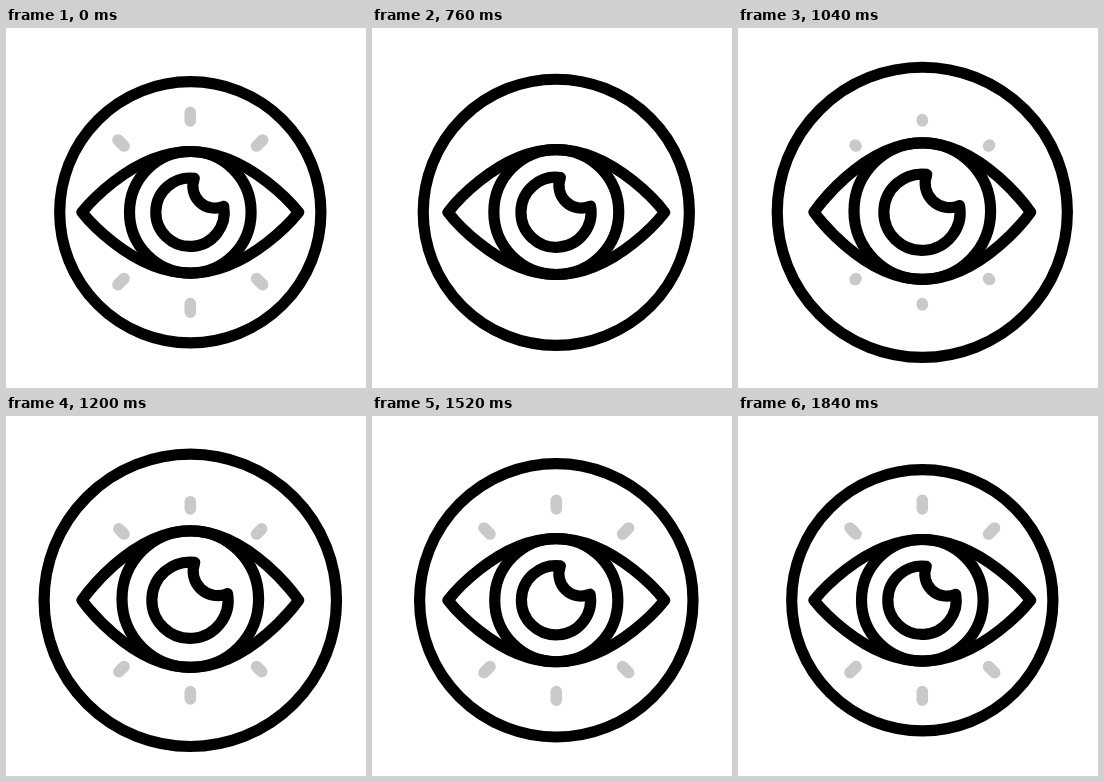
These frames come from a looping animation (360 px wide and 360 px high, 1.88 s). An HTML page:

```html
<!DOCTYPE html>
<html>
<head>
<meta charset="utf-8">
<style>
html, body { margin: 0; width: 100%; height: 100%; overflow: hidden; background: #fff; }
svg { display: block; width: 360px; height: 360px; }
</style>
</head>
<body>
<svg viewBox="0 0 360 360">
  <g transform="translate(184.3 184.3)" fill="none" stroke="#000" stroke-width="11.2" stroke-linecap="round" stroke-linejoin="round">
    <circle id="ring"/>
    <path id="rays" stroke="#c9c9c9" stroke-width="11.6"/>
    <path id="lids"/>
    <circle id="iris"/>
    <path id="pupil"/>
  </g>
</svg>
<script>
const LOOP = 1880;
const [ring, rays, lids, iris, pupil] =
  ['ring', 'rays', 'lids', 'iris', 'pupil'].map(id => document.getElementById(id));

// Smooth 0..1 progress between two times
function ease(t, from, to) {
  const u = Math.min(1, Math.max(0, (t - from) / (to - from)));
  return u * u * (3 - 2 * u);
}

function rayPath(length) {
  if (length <= 0.01) return '';
  return [-90, -45, 45, 90, 135, 225].map(deg => {
    const a = deg * Math.PI / 180;
    const inner = deg % 90 ? 93.7 : 91.3;
    const at = r => `${r * Math.cos(a)} ${r * Math.sin(a)}`;
    return `M${at(inner)}L${at(inner + length)}`;
  }).join('');
}

function draw(t) {
  // The eye moves faster than the ring around it
  const swell = ease(t, 640, 1120) - ease(t, 1200, 1760);
  const widen = ease(t, 640, 1040) - ease(t, 1200, 1600);
  ring.setAttribute('r', 130.6 + 15.6 * swell);

  const r = 60.8 + 7.5 * widen;
  const lift = -1.2 * widen;
  const top = lift - r, bottom = lift + r;
  iris.setAttribute('r', r);
  iris.setAttribute('cy', lift);
  lids.setAttribute('d',
    `M-108.3 0C-108.3 0 -60.3 ${top} 0 ${top}S108.3 0 108.3 0S60.3 ${bottom} 0 ${bottom}S-108.3 0 -108.3 0Z`);

  const s = 1 + 0.115 * widen;
  const p = (x, y) => `${x * s} ${y * s}`;
  pupil.setAttribute('d',
    `M${p(4, -34)}A${p(34.2, 34.2)} 0 1 0 ${p(33.4, -6)}A${p(22, 22)} 0 0 1 ${p(4, -34)}Z`);

  const shown = 1 - ease(t, 40, 440) + ease(t, 960, 1280);
  rays.setAttribute('d', rayPath(8.6 * shown));
}

const start = performance.now();
function tick() {
  draw((performance.now() - start) % LOOP);
  requestAnimationFrame(tick);
}
tick();
</script>
</body>
</html>
```
